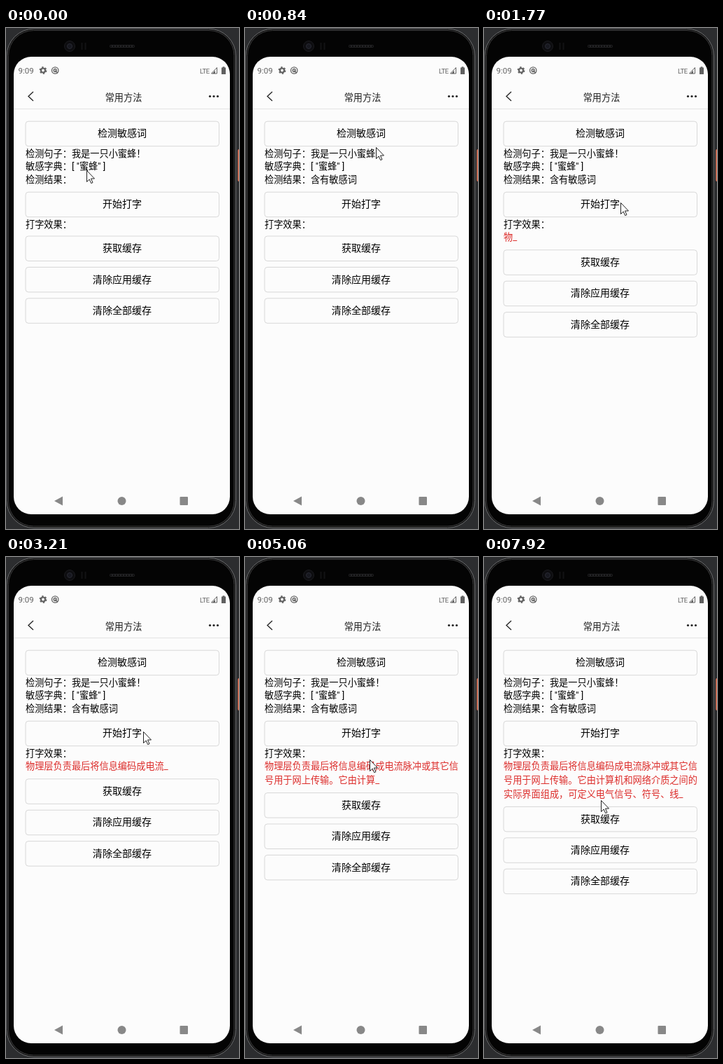
Animation, 333 px wide and 715 px high, one loop 8000 ms. Source, as an HTML page:

```html
<!DOCTYPE html>
<html lang="zh-CN">
<head>
<meta charset="utf-8">
<title>常用方法</title>
<style>
  html, body { margin: 0; width: 100%; height: 100%; overflow: hidden; background: #2c2d2f; }
  svg { display: block; }
  text { font: 13.2px Roboto, "Noto Sans CJK SC", "Noto Sans CJK", sans-serif; white-space: pre; }
  .button rect { fill: #fcfcfc; stroke: #d4d4d4; stroke-width: .9; }
  .button.pressed rect { fill: #f0f0f0; }
  .button text { font-size: 14.05px; text-anchor: middle; }
  .typed { fill: #dc2b29; }
  .status { fill: #606060; }
</style>
</head>
<body>
<svg width="333" height="715" viewBox="0 0 333 715">
  <!-- phone body -->
  <rect x="331.300" y="173" width="4" height="46" rx="2" fill="#e0785d"/>
  <rect x="1" y="1" width="327.500" height="712.500" rx="39" fill="#151515" stroke="#6c6d6f"/>
  <rect x="3.500" y="3.500" width="322.500" height="707.500" rx="36" fill="#040404" stroke="#3a3a3b"/>
  <circle cx="91" cy="26" r="7.500" fill="#0d0d10" stroke="#1b1b1f"/>
  <circle cx="91" cy="26" r="3.500" fill="#17181f" stroke="#292a33"/>
  <path d="M108.500 21v10M113.500 21v10" stroke="#121214" stroke-width="2"/>
  <path d="M150 26H182" stroke="#222224" stroke-width="4" stroke-linecap="round"/>
  <path d="M149 26H184" stroke="#0c0c0c" stroke-width="2" stroke-dasharray="2 2"/>
  <rect x="11" y="41" width="309" height="653" rx="25" fill="#fcfcfc"/>

  <!-- status bar -->
  <g class="status">
    <text x="17.500" y="65" style="font-size:11.5px">9:09</text>
    <circle cx="53" cy="60.500" r="3" fill="none" stroke="#606060" stroke-width="2.200"/>
    <circle cx="53" cy="60.500" r="4.600" fill="none" stroke="#606060" stroke-width="1.600" stroke-dasharray="2.400 2.417"/>
    <circle cx="70.200" cy="60.500" r="4.700" fill="none" stroke="#606060" stroke-width="1.300"/>
    <circle cx="70.200" cy="60.500" r="2" fill="none" stroke="#606060" stroke-width="1.300"/>
    <path d="M70 60.500L74 64.500" stroke="#606060" stroke-width="1.300"/>
    <text x="277" y="64.500" style="font-size:9.5px;letter-spacing:-.4px">LTE</text>
    <path d="M293.500 65H301.500V56.500Z" fill="none" stroke="#606060"/>
    <path d="M295 65H299V60.500Z"/>
    <path d="M308 56.500H309.600V55.300H312.400V56.500H314V66H308Z"/>
  </g>

  <!-- title bar -->
  <path d="M39 91L32 97.500L39 104" fill="none" stroke="#222" stroke-width="1.300"/>
  <text x="168" y="103.500" text-anchor="middle" fill="#222">常用方法</text>
  <g fill="#222"><circle cx="291.500" cy="97.500" r="1.600"/><circle cx="297" cy="97.500" r="1.600"/><circle cx="302.500" cy="97.500" r="1.600"/></g>
  <path d="M11 115.500H320" stroke="#e4e4e4"/>

  <!-- page -->
  <text x="28" y="183.500">检测句子&#xFF1A;我是一只小蜜蜂&#xFF01;</text>
  <text x="28" y="202.300">敏感字典&#xFF1A;[ "蜜蜂" ]</text>
  <text x="28" y="221.100">检测结果&#xFF1A;<tspan id="result"></tspan></text>
  <text x="28" y="284.800">打字效果&#xFF1A;</text>
  <g id="typed"></g>
  <g id="top"></g>
  <g id="bottom"></g>

  <!-- system navigation -->
  <g fill="#888">
    <path d="M69 675L81 668.500V681.500Z"/>
    <circle cx="165.500" cy="675" r="6"/>
    <rect x="248.500" y="669" width="11.500" height="12" rx="1"/>
  </g>
  <path id="cursor" d="M.5.5V16.500L4.200 13L6.700 18.600L9 17.600L6.500 12H11.500Z" fill="#fff" stroke="#222"/>
</svg>
<script>
const LOOP = 8000, PER_LINE = 21, LINE = 19.8;
const MESSAGE = '物理层负责最后将信息编码成电流脉冲或其它信号用于网上传输。它由计算机和网络介质之间的实际界面组成\uFF0C可定义电气信号、符号、线';
const TYPING_START = 1680;

// [time, characters typed]
const TYPING = [[1680, 0], [1770, 1], [2070, 4], [2220, 5], [3000, 13], [3090, 14], [3800, 21],
  [3920, 22], [4700, 30], [5540, 38], [6340, 46], [6430, 47], [6870, 51], [7050, 52],
  [7410, 56], [7560, 57], [7920, 61]];
// [time, x, y] of the pointer tip
const POINTER = [[0, 115, 203], [320, 185, 155], [810, 185, 155], [840, 187, 170], [1320, 195, 249],
  [1770, 195, 249], [2070, 196, 249], [4790, 196, 249], [5060, 178, 289], [5400, 167, 347]];

const $ = id => document.getElementById(id);

function svg(tag, attrs, parent) {
  const node = document.createElementNS('http://www.w3.org/2000/svg', tag);
  for (const key in attrs) node.setAttribute(key, attrs[key]);
  return parent.appendChild(node);
}

function addButton(parent, y, label) {
  const group = svg('g', { class: 'button' }, parent);
  svg('rect', { x: 28, y, width: 276.5, height: 35.5, rx: 4 }, group);
  svg('text', { x: 166, y: y + 22.2 }, group).textContent = label;
  return group;
}

// Linear interpolation of one column of a keyframe list.
function track(keys, t, column = 1) {
  const next = keys.findIndex(key => key[0] > t);
  if (next < 0) return keys[keys.length - 1][column];
  if (next === 0) return keys[0][column];
  const a = keys[next - 1], b = keys[next];
  return a[column] + (b[column] - a[column]) * (t - a[0]) / (b[0] - a[0]);
}

const detect = addButton($('top'), 133.2, '检测敏感词');
const type = addButton($('top'), 234.2, '开始打字');
['获取缓存', '清除应用缓存', '清除全部缓存'].forEach((label, i) =>
  addButton($('bottom'), 297 + i * 44.4, label));
const lines = [0, 1, 2].map(i => svg('text', { class: 'typed', x: 28, y: 302.9 + i * LINE }, $('typed')));

function draw(t) {
  detect.classList.toggle('pressed', t >= 660 && t < 840);
  type.classList.toggle('pressed', t >= 1530 && t < TYPING_START);
  $('result').textContent = t >= 840 ? '含有敏感词' : '';

  const typing = t >= TYPING_START;
  const count = Math.floor(track(TYPING, t) + 1e-6);
  const shown = typing ? MESSAGE.slice(0, count) + '_' : '';
  lines.forEach((line, i) => line.textContent = shown.slice(i * PER_LINE, (i + 1) * PER_LINE));
  const lineCount = Math.ceil(shown.length / PER_LINE);
  $('bottom').setAttribute('transform', `translate(0 ${lineCount * LINE})`);

  const x = Math.round(track(POINTER, t, 1)), y = Math.round(track(POINTER, t, 2));
  $('cursor').setAttribute('transform', `translate(${x} ${y})`);
}

function tick() {
  draw(performance.now() % LOOP);
  requestAnimationFrame(tick);
}
tick();
</script>
</body>
</html>
```
